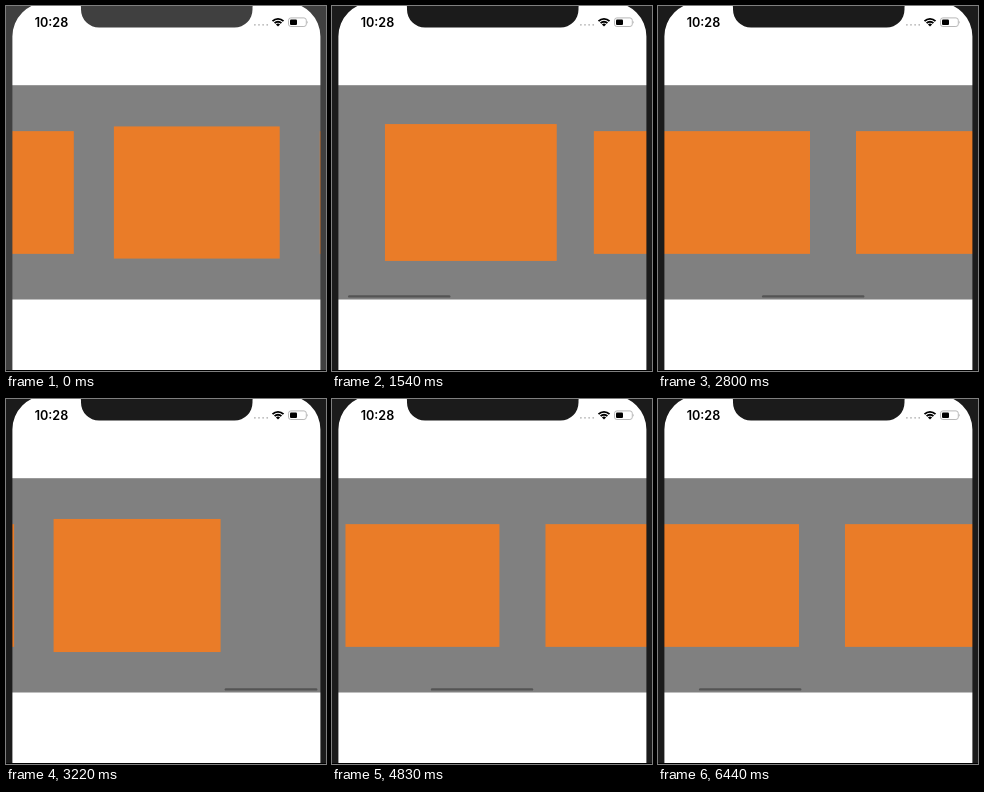
Write an HTML page that moves like this. It is 320 px wide and 365 px high and loops after 6510 ms.

```html
<!DOCTYPE html>
<html lang="en">
<head>
<meta charset="utf-8">
<title>Card carousel</title>
<style>
  html, body { margin: 0; width: 100%; height: 100%; overflow: hidden; background: #fff; }
  svg { display: block; width: 100%; height: 100%; }
  .card { fill: #ea7c28; }
  .time { font: 600 12.6px Inter, "Liberation Sans", sans-serif; text-anchor: middle; }
  .arc { fill: none; stroke: #000; stroke-width: 1.9; }
</style>
</head>
<body>
<svg viewBox="0 0 320 365">
  <rect width="320" height="365" fill="#fff"/>
  <rect x="6" y="79.2" width="309" height="214.3" fill="#808080"/>
  <g id="cards"></g>
  <rect id="bar" y="289.2" height="2.4" rx="1.2" fill="#000"/>

  <!-- bezel with the screen cut out, then the notch -->
  <g id="bezel">
    <path fill-rule="evenodd" d="M0 0H320V365H0Z
      M6.4 400V30.5A34 34 0 0 1 40.4 -3.5H280.4A34 34 0 0 1 314.4 30.5V400Z"/>
    <path d="M73 -4Q75 -2 75 2V3.5A18 18 0 0 0 93 21.5H228.5A18 18 0 0 0 246.5 3.5V2Q246.5 -2 248.5 -4Z"/>
  </g>
  <rect y="364" width="320" height="1" fill="#000"/>

  <text class="time" x="45.5" y="21">10:28</text>
  <path d="M248.9 18.8h14" stroke="#b4b4b4" stroke-width="1.8" stroke-linecap="round" stroke-dasharray="0 4.1"/>
  <g transform="translate(272 20.6)">
    <path d="M0 0L-2.1 -2.1A3 3 0 0 1 2.1 -2.1Z"/>
    <path class="arc" d="M-3.4 -3.4A4.8 4.8 0 0 1 3.4 -3.4"/>
    <path class="arc" d="M-5.5 -5.5A7.8 7.8 0 0 1 5.5 -5.5"/>
  </g>
  <g transform="translate(282.5 11.9)">
    <rect width="17.8" height="8.6" rx="2.4" fill="none" stroke="#b0b0b0" stroke-width=".9"/>
    <rect x="1.5" y="1.5" width="7" height="5.6" rx="1.1"/>
    <path d="M18.8 2.8Q20.3 4.3 18.8 5.8Z" fill="#b0b0b0"/>
  </g>
</svg>
<script>
const LOOP = 6510, STEP = 70;
const COUNT = 4, PITCH = 200, CARD_W = 154, CARD_H = 122.7;
const MID_X = 160, MID_Y = 186.5, START = 169.2, END = PITCH * (COUNT - 1);

const decay = (ms, tau) => Math.exp(-ms / tau);

// drag back, let go, and glide to the first card
function swipeBack(ms) {
  const drag = 385;
  if (ms < drag) return START - (START - 111) * (ms / drag) ** 2;
  return 111 * decay(ms - drag, 190);
}

// fling forward, slow down evenly, and bounce past the last card
function fling(ms) {
  const glide = 300, v0 = 1.3, v1 = 0.8;
  const left = ms - glide;
  if (left > 0) return END + v1 * left * decay(left, 100);
  return END + v1 * left - (v0 - v1) / (2 * glide) * left * left;
}

// long drag back that keeps slowing down
const slowDrag = ms => 88 + (END - 88) * decay(ms, 516);

function offsetAt(t) {
  if (t < 840) return START;
  if (t < 2240) return swipeBack(t - 840);
  if (t < 2800) return 0;
  if (t < 3850) return fling(t - 2800);
  if (t < 4410) return END;
  return slowDrag(t - 4295);
}

// shown from the first time on, half faded for one step at the second
function visible(t, from, fade) {
  if (t < from || t >= fade + STEP) return 0;
  return t < fade ? 1 : 0.5;
}

const byId = id => document.getElementById(id);
const set = (el, attrs) => {
  for (const name in attrs) el.setAttribute(name, attrs[name]);
};

const cards = Array.from({ length: COUNT }, () => {
  const card = document.createElementNS("http://www.w3.org/2000/svg", "rect");
  set(card, { class: "card" });
  return byId("cards").appendChild(card);
});

function draw(t) {
  const offset = offsetAt(t);
  cards.forEach((card, i) => {
    const x = MID_X + i * PITCH - offset;
    const scale = 1 + 0.2 * Math.max(0, 1 - Math.abs(x - MID_X) / 50);
    const width = CARD_W * scale, height = CARD_H * scale;
    set(card, { x: x - width / 2, y: MID_Y - height / 2, width, height });
  });

  const shown = visible(t, 910, 2380) + visible(t, 2800, 3920) + visible(t, 4410, LOOP);
  set(byId("bar"), {
    x: 9 + offset / 3,
    width: 102.4 - Math.max(0, offset - END) / 3,
    "fill-opacity": 0.35 * shown
  });
  set(byId("bezel"), { fill: t < 560 ? "#404040" : t < 630 ? "#2c2c2c" : "#1b1b1b" });
}

const start = performance.now();
function tick() {
  const t = (performance.now() - start) % LOOP;
  draw(Math.floor(t / STEP) * STEP);
  requestAnimationFrame(tick);
}
tick();
</script>
</body>
</html>
```
